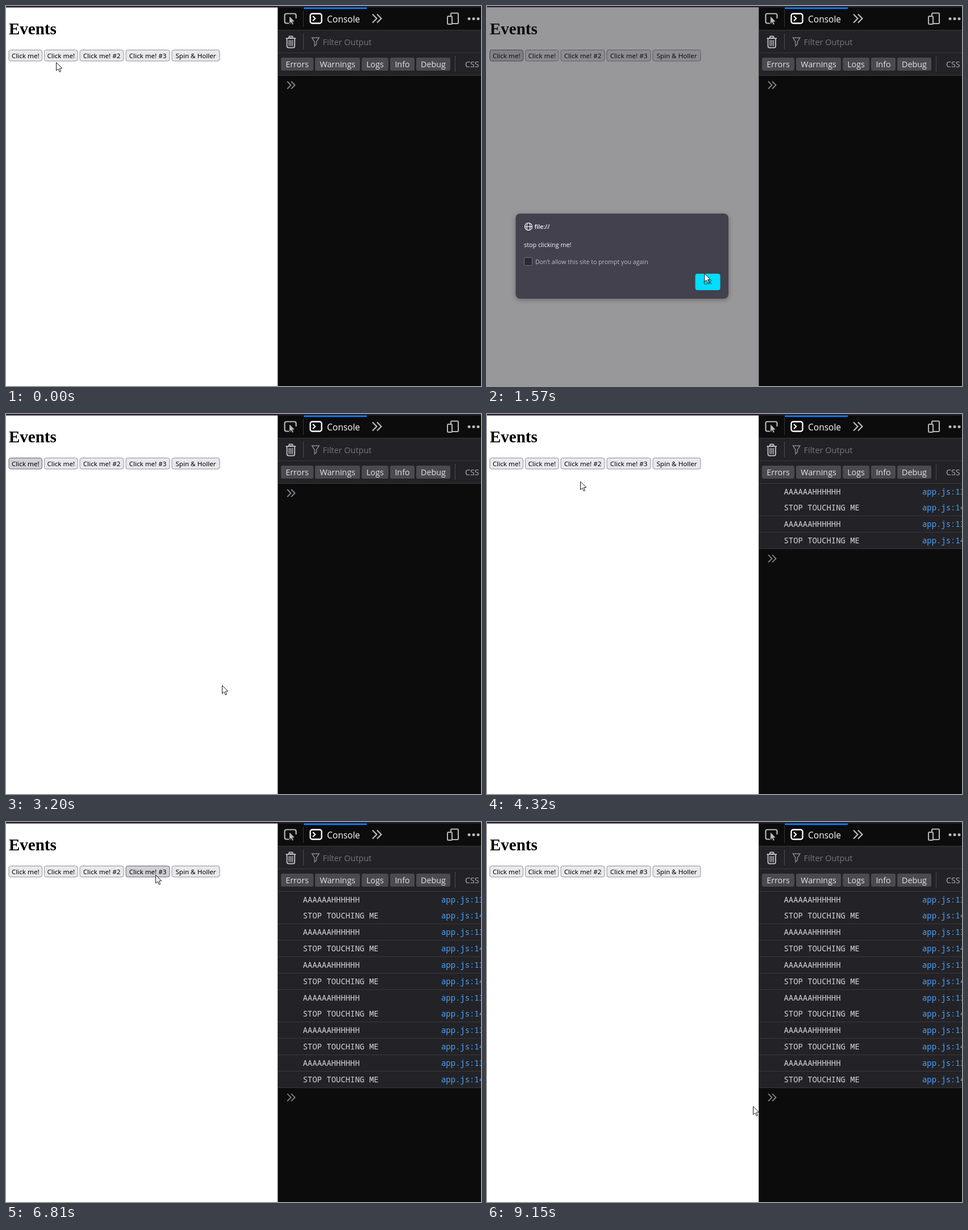
Write an HTML page with a canvas that moves like this. It is 836 by 670 pixels and loops after 9.22 s.

```html
<!DOCTYPE html>
<html lang="en">
<head>
<meta charset="utf-8">
<title>Events</title>
<style>
html, body { margin: 0; width: 100%; height: 100%; overflow: hidden; background: #fff; }
canvas { display: block; }
</style>
</head>
<body>
<canvas id="stage" width="836" height="670"></canvas>
<script>
const ctx = document.getElementById('stage').getContext('2d');
const LOOP = 9220;
const PANEL_X = 478;
const PANEL_W = 358;
const ROWS_Y = 122.5;
const ROW_H = 28.85;
const BUTTON_TOP = 77;
const BUTTON_BOTTOM = 98;
const UI = '"Open Sans", sans-serif';
const FORM = '"Noto Sans", sans-serif';
const MONO = '"Noto Sans Mono", monospace';
const SERIF = '"Liberation Serif", serif';
const GRAY = '#b8b8ba';
const LINE = '#38383d';

// Buttons flow left to right with a fixed gap.
let nextX = 5;
const buttons = [
  ['Click me!', 58.5], ['Click me!', 58.5], ['Click me! #2', 77], ['Click me! #3', 77], ['Spin & Holler', 84]
].map(([label, w]) => {
  const x = nextX;
  nextX += w + 4;
  return { label, x, w };
});

const dialogs = [
  { from: 460, to: 1570, button: 0, text: 'you clicked me!' },
  { from: 1570, to: 2660, button: 0, text: 'stop clicking me!', repeat: true },
  { from: 7600, to: 9080, button: 3, text: 'CLICKED!' }
];

// The pointer sweeps over the "#2" button and back, a little higher each time.
const REST_Y = 120;
const HALF_SWEEP = 300;
const sweeps = [4050, 5466, 6080].map((peak, i) => ({ peak, depth: 62 + 11 * i }));

// Each sweep enters the button twice: from below, then from above.
function crossing(sweep, y, side) {
  const phase = Math.acos(Math.sqrt((REST_Y - y) / sweep.depth));
  return sweep.peak + side * HALF_SWEEP * phase * 2 / Math.PI;
}
const enters = sweeps.flatMap(s => [crossing(s, BUTTON_BOTTOM, -1), crossing(s, BUTTON_TOP, 1)]);

function sweepLift(t) {
  return sweeps.reduce((lift, { peak, depth }) => {
    const u = (t - peak) / HALF_SWEEP;
    return Math.abs(u) < 1 ? lift + depth * Math.cos(u * Math.PI / 2) ** 2 : lift;
  }, 0);
}

const smooth = u => u * u * (3 - 2 * u);
const overshoot = u => 1 + 2.3 * (u - 1) ** 3 + 1.3 * (u - 1) ** 2;

const home = [88, 99];
const ok = [388, 476];
const glides = [
  { from: 70, to: 350, end: [32, 91] },
  { from: 820, to: 1370, end: ok, ease: overshoot },
  { from: 1550, to: 1710, end: [268, 380] },
  { from: 1710, to: 2390, end: [388, 487] },
  { from: 2640, to: 3200, end: [380, 478] },
  { from: 3200, to: 3550, end: [164, REST_Y] },
  { from: 6390, to: 6800, end: [263, 93] },
  { from: 8000, to: 8880, end: ok, ease: overshoot },
  { from: 9010, to: 9150, end: [468, 501] }
];

function pointerAt(t) {
  let [x, y] = home;
  for (const { from, to, end, ease = smooth } of glides) {
    if (t < from) break;
    const e = ease(Math.min(1, (t - from) / (to - from)));
    x += (end[0] - x) * e;
    y += (end[1] - y) * e;
  }
  return [x, y - sweepLift(t)];
}

// A button keeps its hover look under a dialog, until the pointer is tracked again.
function hoveredAt(t, [x, y]) {
  const held = dialogs.find(d => t >= d.from - 70 && t < d.to);
  if (held) return held.button;
  if (t > dialogs[1].to && t < 3250) return dialogs[1].button;
  if (y < BUTTON_TOP || y > BUTTON_BOTTOM) return -1;
  return buttons.findIndex(b => x >= b.x && x <= b.x + b.w);
}

const isPressed = t => dialogs.some(d => !d.repeat && t >= d.from - 70 && t < d.from);

function rect(x, y, w, h, color) {
  ctx.fillStyle = color;
  ctx.fillRect(x, y, w, h);
}

function paint({ fill, line, width = 1 }) {
  if (fill) { ctx.fillStyle = fill; ctx.fill(); }
  if (line) { ctx.strokeStyle = line; ctx.lineWidth = width; ctx.stroke(); }
}

function box(x, y, w, h, r, style) {
  ctx.beginPath();
  ctx.roundRect(x, y, w, h, r);
  paint(style);
}

function oval(x, y, rx, ry, style) {
  ctx.beginPath();
  ctx.ellipse(x, y, rx, ry, 0, 0, 2 * Math.PI);
  paint(style);
}

function poly(points, style) {
  ctx.beginPath();
  points.forEach(([x, y]) => ctx.lineTo(x, y));
  if (style.close) ctx.closePath();
  paint(style);
}

function text(str, x, y, font, color, align = 'left') {
  ctx.font = font;
  ctx.fillStyle = color;
  ctx.textAlign = align;
  ctx.fillText(str, x, y);
}

function chevron(x, y, size, line, width) {
  poly([[x, y - size], [x + size, y], [x, y + size]], { line, width });
}

function arrow(x, y, scale, style) {
  ctx.save();
  ctx.translate(x, y);
  ctx.scale(scale, scale);
  poly([[0, 0], [0, 14.5], [3.4, 11.4], [5.8, 16.8], [8, 15.8], [5.7, 10.6], [10.2, 10.3]],
    { ...style, close: true });
  ctx.restore();
}

function drawPage(hover, pressed) {
  rect(0, 0, PANEL_X, 670, '#fff');
  text('Events', 5, 50, 'bold 29px ' + SERIF, '#000');
  buttons.forEach(({ label, x, w }, i) => {
    const on = i === hover;
    const fill = !on ? '#e9e9ed' : pressed ? '#b1b1b9' : '#d0d0d7';
    box(x, 77.5, w, 19.5, 3.5, { fill, line: on ? '#676774' : '#8f8f9d' });
    text(label, x + w / 2, 92, '11.6px ' + FORM, '#000', 'center');
  });
}

function drawPicker() {
  box(490.5, 13.5, 20, 17, 3, { line: GRAY, width: 2.2 });
  rect(501, 22, 12, 11, '#0c0c0d');
  arrow(499, 18.5, 0.85, { fill: GRAY, line: '#0c0c0d', width: 2 });
  arrow(499, 18.5, 0.85, { fill: GRAY });
}

function drawTrash() {
  const style = { line: GRAY, width: 2 };
  box(498, 53.5, 6.5, 3, 1, style);
  rect(492.5, 56, 17.5, 2, GRAY);
  box(494.5, 57, 13.5, 16.5, [0, 0, 3, 3], style);
  for (let i = 0; i < 3; i++) rect(497.5 + 3 * i, 60, 1.6, 10.5, GRAY);
}

function drawToolbar() {
  drawPicker();
  box(535.5, 13.5, 20, 17, 3.5, { line: '#fff', width: 2.3 });
  chevron(540, 22, 4.2, '#fff', 2);
  text('Console', 565, 28.5, '15.5px ' + UI, '#fff');
  for (const x of [645, 653]) chevron(x, 22, 7.5, GRAY, 2.2);

  box(783, 12.5, 13, 18.5, 1.5, { line: GRAY, width: 2 });
  box(777, 18, 8, 14, 1.5, { fill: '#0c0c0d', line: GRAY, width: 2 });
  for (let i = 0; i < 3; i++) oval(815 + 8 * i, 22.5, 2.5, 2.5, { fill: GRAY });

  drawTrash();
  poly([[538.5, 56], [551, 56], [546.5, 63], [546.5, 67.5], [543, 70.5], [543, 63]],
    { line: '#8b8b8f', width: 1.4, close: true });
  text('Filter Output', 557.5, 68.5, '14.5px ' + UI, '#75757a');
}

function drawFilters() {
  const font = '14.3px ' + UI;
  let x = 484;
  for (const label of ['Errors', 'Warnings', 'Logs', 'Info', 'Debug']) {
    ctx.font = font;
    const w = Math.round(ctx.measureText(label).width + 16.5);
    box(x, 91, w, 23, 3, { fill: '#4a4a4f' });
    text(label, x + w / 2, 108, font, '#e4e4e6', 'center');
    x += w + 3;
  }
  text('CSS', 808, 108, font, '#b1b1b3');
}

function drawLog(rowCount) {
  const font = '13.9px ' + MONO;
  for (let i = 0; i < rowCount; i++) {
    const y = Math.round(ROWS_Y + i * ROW_H);
    const [message, place] = i % 2 ? ['STOP TOUCHING ME', 'app.js:14:11'] : ['AAAAAAHHHHHH', 'app.js:13:11'];
    rect(PANEL_X, y, PANEL_W, ROW_H, '#232327');
    rect(PANEL_X, y + 28, PANEL_W, 1, LINE);
    text(message, 522.5, y + 19, font, '#d7d7db');
    text(place, 766, y + 19, font, '#4ba4ff');
  }
  const promptY = ROWS_Y + 17 + rowCount * ROW_H;
  for (const x of [495, 502]) chevron(x, promptY, 6.5, '#87878b', 1.8);
}

function drawPanel(rowCount) {
  rect(PANEL_X, 0, PANEL_W, 670, '#0c0c0d');
  rect(PANEL_X, 42, PANEL_W, 80.5, '#232327');
  for (const y of [42, 82, 122]) rect(PANEL_X, y, PANEL_W, 1, LINE);
  rect(523, 8, 1, 29, LINE);
  rect(523, 49, 1, 27, '#4a4a4f');
  rect(790, 88, 1, 28, '#4a4a4f');
  drawToolbar();
  drawFilters();
  drawLog(rowCount);
  rect(PANEL_X, 3, 1, 667, LINE);
  rect(0, 0, 836, 2.6, '#252030');
  rect(524, 2.6, 111, 2.6, '#0a84ff');
}

function drawGlobe(x, y) {
  const style = { line: '#fbfbfe', width: 1.2 };
  for (const rx of [6.5, 3]) oval(x, y, rx, 6.5, style);
  poly([[x - 6.5, y], [x + 6.5, y]], style);
}

function drawDialog(d, t) {
  const height = d.repeat ? 150 : 120;
  const top = 441 - height / 2;
  const okY = top + height - 44;
  const font = '10.8px ' + UI;
  ctx.save();
  ctx.globalAlpha = d.repeat ? 1 : Math.min(1, (t - d.from) / 140);
  rect(0, 3, PANEL_X, 667, 'rgba(28,27,34,.45)');
  ctx.shadowColor = 'rgba(0,0,0,.3)';
  ctx.shadowBlur = 9;
  ctx.shadowOffsetY = 2;
  box(50.5, top, 374.5, height, 8, { fill: '#42414d' });
  ctx.shadowColor = 'transparent';
  drawGlobe(73, top + 23);
  text('file://', 83.5, top + 27, '600 10.5px ' + UI, '#fbfbfe');
  text(d.text, 65, top + 59, font, '#fbfbfe');
  if (d.repeat) {
    box(65.5, top + 77.5, 14, 14, 2, { fill: '#2b2a33', line: '#74737d' });
    text('Don’t allow this site to prompt you again', 85, top + 88.5, '10.6px ' + UI, '#bdbcc4');
  }
  box(366.5, okY, 44, 29, 4, { fill: '#00ddff' });
  text('OK', 388.5, okY + 19, font, '#2b2a33', 'center');
  ctx.restore();
}

function render(t) {
  const pointer = pointerAt(t);
  const dialog = dialogs.find(d => t >= d.from && t < d.to);
  drawPage(hoveredAt(t, pointer), isPressed(t));
  if (dialog) drawDialog(dialog, t);
  arrow(pointer[0] + 0.5, pointer[1] + 0.5, 1, { fill: '#fff', line: '#17161c' });
  drawPanel(2 * enters.filter(e => e <= t).length);
}

const start = performance.now();
function tick() {
  render((performance.now() - start) % LOOP);
  requestAnimationFrame(tick);
}
tick();
</script>
</body>
</html>
```
